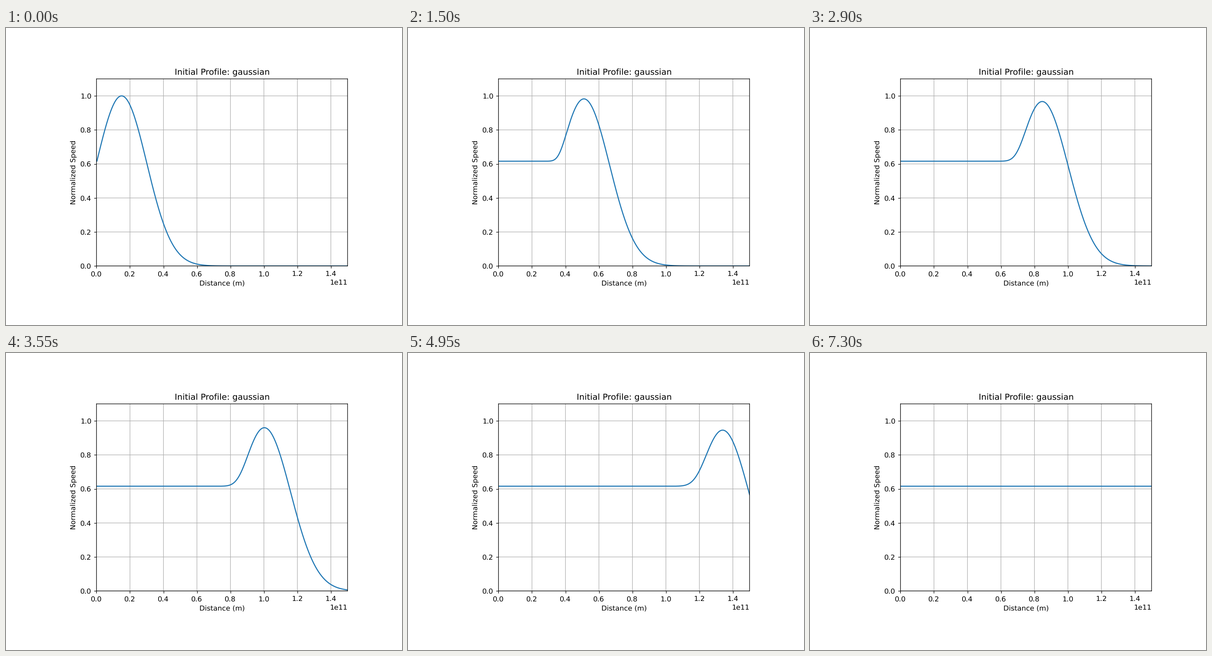
A matplotlib script for the animation above (9400 ms loop, 864 by 648 pixels).

```python
import numpy as np
import matplotlib.pyplot as plt
from matplotlib.animation import FuncAnimation

# soft, unsnapped lines and unhinted text
plt.rcParams["path.snap"] = False
plt.rcParams["text.hinting"] = "none"

W, H = 864, 648
DPI = 110.592
FRAMES, MOVING = 188, 146   # the wave has left the domain after MOVING frames
INTERVAL = 50

LENGTH = 1.5e11
SPEED = 4.005e5             # m/s
CELLS, SUBSTEPS = 650, 200
DT = 3000 / SUBSTEPS

x = np.linspace(0, LENGTH, CELLS + 1)
courant = SPEED * DT / (x[1] - x[0])


def simulate():
    """Upwind advection of a gaussian with an open left boundary."""
    u = np.exp(-0.5 * ((x - 0.15e11) / 0.15e11) ** 2)
    u[0] = u[1]
    states = [u.copy()]
    for _ in range(MOVING):
        for _ in range(SUBSTEPS):
            u[1:] -= courant * (u[1:] - u[:-1])
        states.append(u.copy())
    return states


states = simulate()

fig = plt.figure(figsize=(W / DPI, H / DPI), dpi=DPI, facecolor="white")
left, bottom, width, height = 197.45, H - 519.2, 547.8, 408.2
ax = fig.add_axes([left / W, bottom / H, width / W, height / H])
ax.set_xlim(0, LENGTH)
ax.set_ylim(0, 1.1)
ax.set_xlabel("Distance (m)")
ax.set_ylabel("Normalized Speed", labelpad=4.5)
ax.set_title("Initial Profile: gaussian")
ax.grid(True)
line, = ax.plot(x, states[0])


def update(i):
    line.set_ydata(states[min(i, MOVING)])
    return line,


anim = FuncAnimation(fig, update, frames=FRAMES, interval=INTERVAL,
                     repeat=True, repeat_delay=0, blit=False)
plt.show()
```
